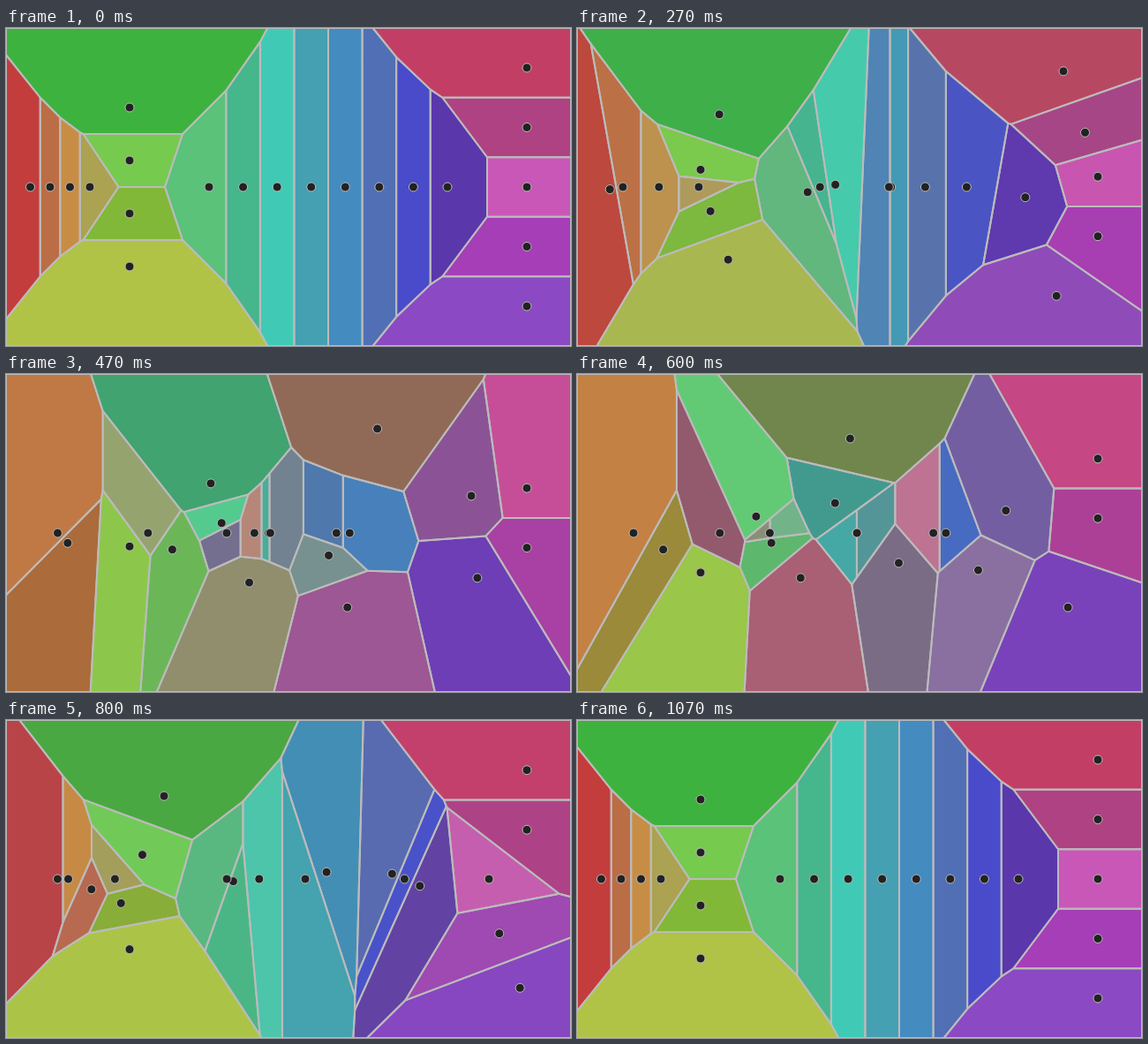
An HTML page with a canvas that plays this animation: 640x360 px, repeating every 2.07 s.

```html
<!DOCTYPE html>
<html lang="en">
<head>
<meta charset="utf-8">
<title>Voronoi shuffle</title>
<style>
  html, body { margin: 0; width: 100%; height: 100%; overflow: hidden; }
  canvas { display: block; }
</style>
</head>
<body>
<canvas id="stage" width="640" height="360"></canvas>
<script>
const W = 640, H = 360, LOOP = 2070, FPS = 15;
const ctx = document.getElementById('stage').getContext('2d');

const row = (n, x, y, dx, dy) =>
  Array.from({ length: n }, (_, i) => [x + i * dx, y + i * dy]);

// Home positions, in order of hue
const homes = [
  ...row(4, 27.5, 180, 22.5, 0),
  ...row(4, 140, 270, 0, -60),
  ...row(8, 230, 180, 270 / 7, 0),
  ...row(5, 590, 315, 0, -67.5)
];

const colors = ('c33d3d bb6d45 c88d44 aba252 b0c347 82b838 76ca4e ' +
  '3eb23f 5ac279 46b68c 40cab5 45a0b2 448bc0 506fb5 494bca 5b37ac ' +
  '8b49c3 a63eb7 c857b7 af4282 c33e65').split(' ')
  .map(hex => [0, 2, 4].map(i => parseInt(hex.slice(i, i + 2), 16)));

// Home that each site travels to
const goals = [5, 2, 10, 18, 15, 9, 4, 12, 17, 11, 6, 14, 0, 3, 8, 16, 1, 19, 20, 13, 7];

const mix = (a, b, t) => a.map((v, i) => v + (b[i] - v) * t);

function ease(x) {
  x = Math.min(1, Math.max(0, x));
  return x * x * x * (x * (6 * x - 15) + 10);
}

// Keep the part of the polygon that is nearer to a than to b
function clipNearer(polygon, a, b) {
  const nx = b[0] - a[0], ny = b[1] - a[1];
  const mid = (nx * (a[0] + b[0]) + ny * (a[1] + b[1])) / 2;
  const side = p => p[0] * nx + p[1] * ny - mid;
  const kept = [];
  polygon.forEach((p, i) => {
    const q = polygon[(i + 1) % polygon.length];
    const sp = side(p), sq = side(q);
    if (sp <= 0) kept.push(p);
    if (sp * sq < 0) kept.push(mix(p, q, sp / (sp - sq)));
  });
  return kept;
}

function cellPath(site, sites) {
  let polygon = [[0, 0], [W, 0], [W, H], [0, H]];
  for (const other of sites) {
    if (other !== site) polygon = clipNearer(polygon, site, other);
  }
  const path = new Path2D();
  polygon.forEach(p => path.lineTo(...p));
  path.closePath();
  return path;
}

function draw(time) {
  const step = Math.floor((time + 4) * FPS / 1000);
  const t = ease((step - 0.5) / FPS);
  const sites = homes.map((p, i) => mix(p, homes[goals[i]], t));
  const cells = sites.map(site => cellPath(site, sites));

  cells.forEach((cell, i) => {
    ctx.fillStyle = `rgb(${mix(colors[i], colors[goals[i]], t).map(Math.round)})`;
    ctx.fill(cell);
  });

  ctx.strokeStyle = '#bbb';
  ctx.lineJoin = 'round';
  ctx.lineWidth = 2;
  cells.forEach(cell => ctx.stroke(cell));

  ctx.fillStyle = '#222';
  ctx.lineWidth = 1;
  for (const [x, y] of sites) {
    ctx.beginPath();
    ctx.arc(x, y, 5, 0, 2 * Math.PI);
    ctx.fill();
    ctx.stroke();
  }
}

function frame() {
  draw(performance.now() % LOOP);
  requestAnimationFrame(frame);
}
frame();
</script>
</body>
</html>
```
